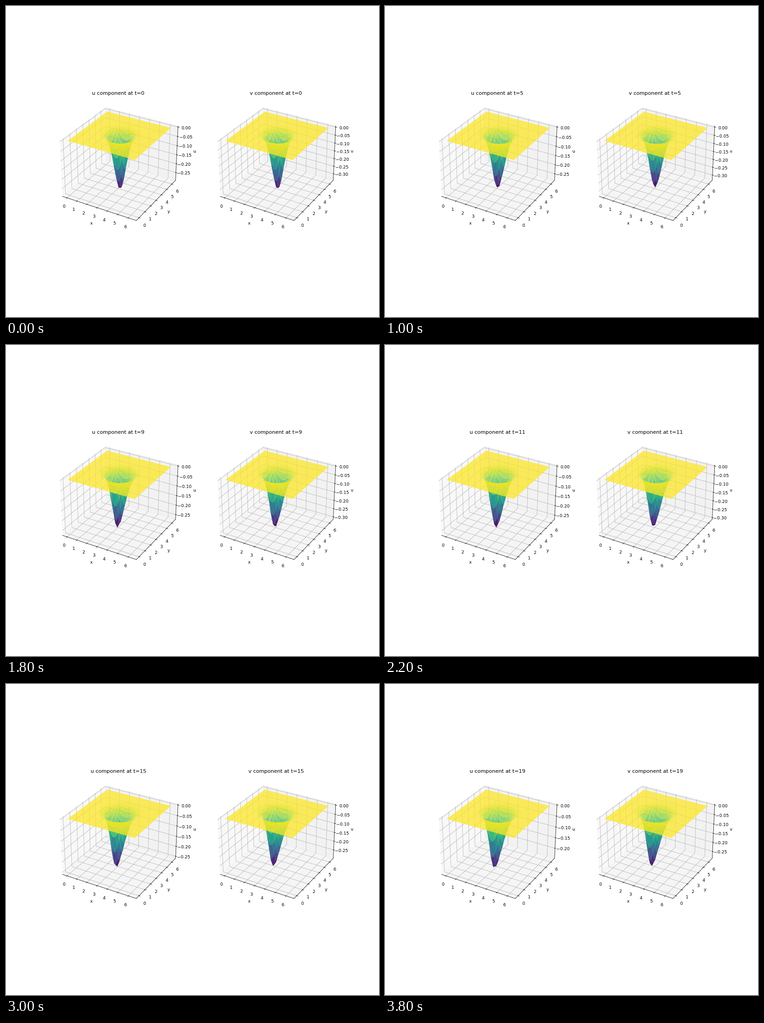
Write a matplotlib script that moves like this. It is 820x683 px and loops after 4 s.

```python
import numpy as np
import matplotlib.pyplot as plt
from matplotlib.animation import FuncAnimation

FRAMES, INTERVAL = 20, 200
N = 32
NU = 0.04          # viscosity
FRAME_DT = 0.05    # simulated time per frame
SUBSTEPS = 10

x = np.linspace(0, 2 * np.pi, N)
h = x[1] - x[0]
X, Y = np.meshgrid(x, x)


def ddx(f, axis):
    """Fourth-order central derivative on a periodic grid."""
    near = np.roll(f, -1, axis) - np.roll(f, 1, axis)
    far = np.roll(f, -2, axis) - np.roll(f, 2, axis)
    return (8 * near - far) / (12 * h)


def laplacian(f):
    rolled = sum(np.roll(f, s, a) for s in (-1, 1) for a in (0, 1))
    return (rolled - 4 * f) / h**2


def rates(w):
    u, v = w
    du = NU * laplacian(u) - ddx(u * u / 2, 1) - ddx(u * v, 0)
    dv = NU * laplacian(v) - ddx(u * v, 1) - ddx(v * v / 2, 0)
    return np.array([du, dv])


def solve():
    bump = np.exp(-2 * ((X - np.pi)**2 + (Y - np.pi)**2))
    w = np.array([-0.3 * bump, -0.35 * bump])
    dt = FRAME_DT / SUBSTEPS
    states = [w]
    for _ in range(FRAMES - 1):
        for _ in range(SUBSTEPS):
            mid = w + dt / 2 * rates(w)
            w = w + dt * rates(mid)
        states.append(w)
    return states


states = solve()

dpi = 820 / 12
fig = plt.figure(figsize=(820.001 / dpi, 683.001 / dpi), dpi=dpi)
axes = [fig.add_subplot(1, 2, i, projection="3d") for i in (1, 2)]


def draw(frame):
    for ax, name, z in zip(axes, "uv", states[frame]):
        ax.clear()
        ax.plot_surface(X, Y, z, cmap="viridis", alpha=0.8)
        ax.set_title(f"{name} component at t={frame}")
        ax.set_xlabel("x")
        ax.set_ylabel("y")
        ax.set_zlabel(name)
    return axes


anim = FuncAnimation(fig, draw, frames=FRAMES, interval=INTERVAL,
                     init_func=lambda: draw(0), repeat=True, repeat_delay=0)
plt.show()
```
